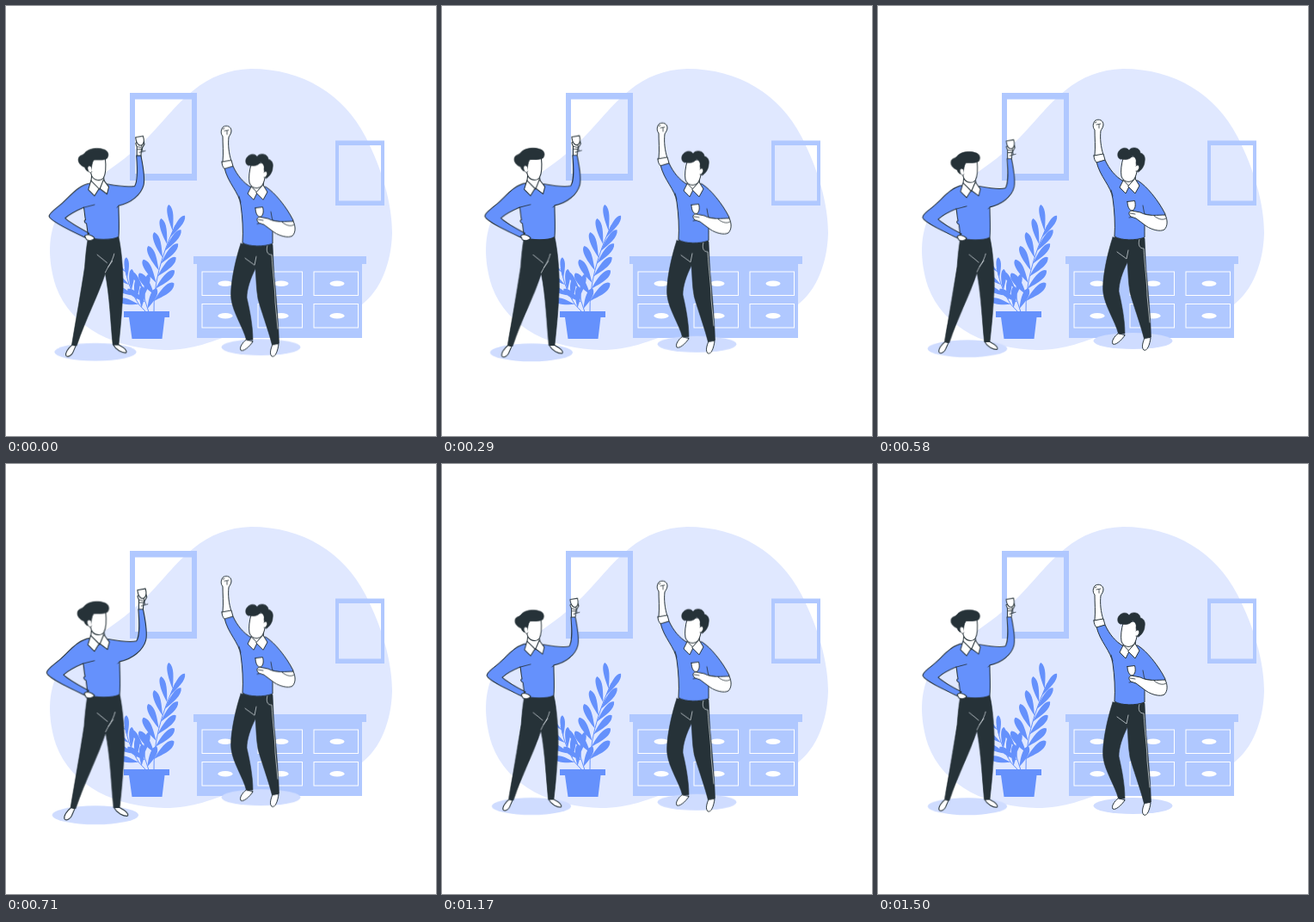
Write an HTML page that moves like this. It is 500x500 px and loops after 1.54 s.

```html
<!DOCTYPE html>
<html lang="en">
<head>
<meta charset="utf-8">
<title>Toast</title>
<style>
  html, body { margin: 0; width: 100%; height: 100%; overflow: hidden; background: #fff; }
  svg { display: block; width: 100vw; height: 100vh; }
  .blob { fill: #e0e8ff; }
  .frame { fill: #b0c8ff; fill-rule: evenodd; }
  .drawer { fill: none; stroke: #fff; }
  .knob { fill: #fff; }
  .plant { fill: #6591fc; }
  .stem { fill: none; stroke: #6591fc; }
  .shadow { fill: #cfdcff; }
  .man path { stroke: #263238; stroke-linejoin: round; stroke-linecap: round; }
  .man .skin { fill: #fff; }
  .man .knit { fill: #6591fc; }
  .man .dark { fill: #263238; stroke-width: .6; }
  .man .line { fill: none; stroke-width: .8; }
  .man .seam { fill: none; stroke: #dfe5ea; stroke-width: .7; }
  .pulse, .float { transform-box: view-box; animation: 1540ms linear -41ms infinite; }
  .pulse { transform-origin: 105.5px 282px; animation-name: pulse; }
  .float { animation-name: float; }
  @keyframes pulse {
    0%, 30%, 40%, 60%, 100% { transform: scale(1); }
    10%, 50% { transform: scale(1.1); }
  }
  @keyframes float {
    0%, 100% { transform: translateY(0); }
    50% { transform: translateY(-10px); }
  }
</style>
</head>
<body>
<svg viewBox="0 0 500 500" xmlns="http://www.w3.org/2000/svg">
  <path class="blob" d="M285 73C345 73 393 103 418 152C438 191 449 231 449 264C448 300 435 331 414 347C380 372 320 362 270 379C240 390 218 400 185 400C130 399 76 376 58 326C48 294 49 265 60 244C76 214 118 196 150 167C180 140 192 119 218 98C238 82 258 74 285 73Z"/>
  <path class="frame" d="M144 101H222V203H144ZM150 108.500V195H216V108.500Z"/>
  <path class="frame" d="M383 156.500H440V232H383ZM387 162V226.500H436V162Z"/>

  <path class="frame" d="M218 291H419V300H414V386H222V300H218Z"/>
  <g id="drawers"></g>

  <path class="stem" id="stems"/>
  <path class="plant" id="leaves"/>
  <path class="plant" d="M137 355H190V362H184.500L181.500 387H146.500L143 362H137Z"/>

  <g class="man pulse">
    <ellipse class="shadow" cx="104" cy="398" rx="46" ry="10"/>
    <path class="skin" d="M78 390C73 394 70 399 71 402C73 405 78 401 79 398L82 391Z"/>
    <path class="skin" d="M124 390C127 396 134 399 138 399C140 398 138 395 135 393L130 390Z"/>
    <path class="dark" d="M96 269L130 269C133 283 135 304 135 325C134 350 132 372 130 390L123.500 390C121 365 120 335 115 310C107 335 93 361 83 391L77.500 390C82 363 88 330 92 303C93 290 94 279 96 269Z"/>
    <path class="seam" d="M106 289L117 298M125 288C123 297 118 302 115 309M118 303L123 296"/>
    <path class="skin" d="M150.500 179L150.500 168L149 164L152 162L154 166L158 162L159 165L155.500 171L155 179Z"/>
    <path class="skin" d="M149 157.500L157.500 156C159 161 158 165 155.500 166.500C151 167 149.500 162 149 157.500Z"/>
    <path class="line" d="M155.500 166L157 173M153 174.500L160 172.500M151 168L155 169M151 171L156 171"/>
    <path class="knit" d="M98 209C85 211 77 222 67 231C59 238 52 242 52 246C54 252 78 263 93 270L97 265C84 258 74 252 70 248C76 243 84 239 91 236C92 242 92 246 93 250C91 250 91 253 94 254L96 269C103 273 123 273 130 269C131 257 130 246 130 234C144 231 155 222 158 211C160 202 157 188 155 178L150 178C151 191 152 206 148 212C140 214 129 212 118 210Z"/>
    <path class="line" d="M91 236L103 233M130 234L128 236"/>
    <path class="skin" d="M92 268C95 265 100 267 103 270C102 273 97 274 94 272Z"/>
    <path class="skin" d="M100 198L99 208L108 216L114 208L113 200Z"/>
    <path class="skin" d="M99 206L96 216L103 223L108 215Z"/>
    <path class="skin" d="M113 205L119 213L117 221L109 215Z"/>
    <path class="skin" d="M99 183C98 189 98 196 100 201C103 206 110 207 113 203C116 198 116 190 115 180L104 179Z"/>
    <path class="dark" d="M99 195C95 197 93 194 92 191C87 189 84 185 85 181C86 177 90 178 92 175C97 169 108 169 113 171C118 172 120 177 117 181C112 184 106 182 102 183C100 186 100 190 99 195Z"/>
    <path class="skin" d="M99 190C96 188 94 191 96 195C97 197 99 198 100 196" stroke-width=".8"/>
  </g>

  <g class="man float">
    <ellipse class="shadow" cx="296.500" cy="397.500" rx="46" ry="9.500"/>
    <path class="skin" d="M279 389C275 392 271 398 273 401C276 403 283 397 287 391Z"/>
    <path class="skin" d="M310 394C308 399 306 405 309 408C313 410 316 402 317 394Z"/>
    <path class="dark" d="M273 277L310 278C311 295 311 310 313 326C315 350 317 372 317.500 393L309.500 395C305 377 296 353 293 341C291 330 291 318 290 306C284 318 280 330 280 340C283 353 287 372 287 389L279.500 389C276 375 264 357 262 342C260 326 267 295 273 277Z"/>
    <path class="seam" d="M278 294L289 302L291 292M304 279C302 286 304 290 309 290C310 310 313 330 313 345L316 376"/>
    <path class="skin" d="M252 182C253 171 252 161 252 152C249 149 250 143 253 141C257 139 262 141 262 146C262 149 260 151 259 153C258 162 259 172 262 181Z"/>
    <path class="line" d="M254 146L259 145M257 146L257 150M252 144L254 143"/>
    <path class="knit" d="M254 189L264 187C269 198 276 206 284 211L302 211C312 217 326 234 334 250L331 254L310 250C310 260 310 269 310 277C300 281 283 281 275 276C276 262 275 246 273 232C271 217 258 207 254 189Z"/>
    <path class="line" d="M273 229L271 222M310 251L308 240"/>
    <path class="skin" d="M251 182L262 180L264 187L254 190C252 188 251 185 251 182Z"/>
    <path class="skin" d="M290 235.500L298.500 234.500C300 240 299 244 296 246C292 246 290 241 290 235.500Z"/>
    <path class="line" d="M296 246L297 252M292 254L300 253"/>
    <path class="skin" d="M334 251C337 257 337 264 333 268C328 271 318 268 312 264L300 255L294 253C291 250 291 247 295 246L305 248C314 253 325 251 334 251Z"/>
    <path class="line" d="M293 249L299 250M321 252C327 257 332 257 335 255"/>
    <path class="skin" d="M286 207L285 212L291 219L299 212L300 200Z"/>
    <path class="skin" d="M285 211L281 219L288 226L292 218Z"/>
    <path class="skin" d="M299 209L304 217L299 226L291 218Z"/>
    <path class="skin" d="M285 185C283 192 282 200 283 206C285 212 291 214 296 211C300 208 301 201 302 195L300 183Z"/>
    <path class="dark" d="M301 200L300 190C301 187 299 184 296 182C293 187 287 187 284 186C280 187 278 183 279 179C281 173 289 171 292 176C294 171 305 172 305 179C310 180 311 185 310 189C310 194 306 199 303 201Z"/>
    <path class="skin" d="M300 194C303 191 305 195 303 198C302 200 301 200 300 200" stroke-width=".8"/>
  </g>
</svg>
<script>
  function leaf(x, y, angle, len, w) {
    const cos = Math.cos(angle), sin = Math.sin(angle);
    const at = (along, side) =>
      `${x + cos * len * along - sin * w * side} ${y + sin * len * along + cos * w * side}`;
    return `M${x} ${y}C${at(.4, .3)} ${at(.8, .75)} ${at(1, 0)}` +
           `C${at(.95, -.65)} ${at(.5, -.55)} ${x} ${y}Z`;
  }

  // Leaf pairs along a quadratic stem; they narrow and close up towards the tip
  function frond(x0, y0, x1, y1, x2, y2, pairs, size) {
    const mix = (a, b, c, t) => (1 - t) ** 2 * a + 2 * t * (1 - t) * b + t * t * c;
    let d = '';
    for (let i = 0; i < 2 * pairs; i++) {
      const t = .14 + .8 * i / (2 * pairs - 1), side = i % 2 ? -1 : 1;
      const dx = (1 - t) * (x1 - x0) + t * (x2 - x1);
      const dy = (1 - t) * (y1 - y0) + t * (y2 - y1);
      const spread = side > 0 ? .9 - .8 * t : .75 - .2 * t;
      d += leaf(mix(x0, x1, x2, t), mix(y0, y1, y2, t),
                Math.atan2(dy, dx) + side * spread, size, size * (.34 - .1 * t));
    }
    stems.setAttribute('d', (stems.getAttribute('d') || '') + `M${x0} ${y0}Q${x1} ${y1} ${x2} ${y2}`);
    leaves.setAttribute('d', (leaves.getAttribute('d') || '') + d);
  }

  const stems = document.getElementById('stems');
  const leaves = document.getElementById('leaves');
  frond(172, 356, 171, 310, 197, 255, 6, 31);
  frond(166, 356, 160, 342, 160, 328, 2, 26);
  frond(162, 355, 146, 342, 138, 305, 4, 25);

  let html = '';
  for (const x of [228, 293, 358])
    for (const y of [309, 346.5])
      html += `<rect class="drawer" x="${x}" y="${y}" width="51.5" height="27.5"/>` +
              `<ellipse class="knob" cx="${x + 27}" cy="${y + 13.7}" rx="8.5" ry="3.2"/>`;
  document.getElementById('drawers').innerHTML = html;
</script>
</body>
</html>
```
